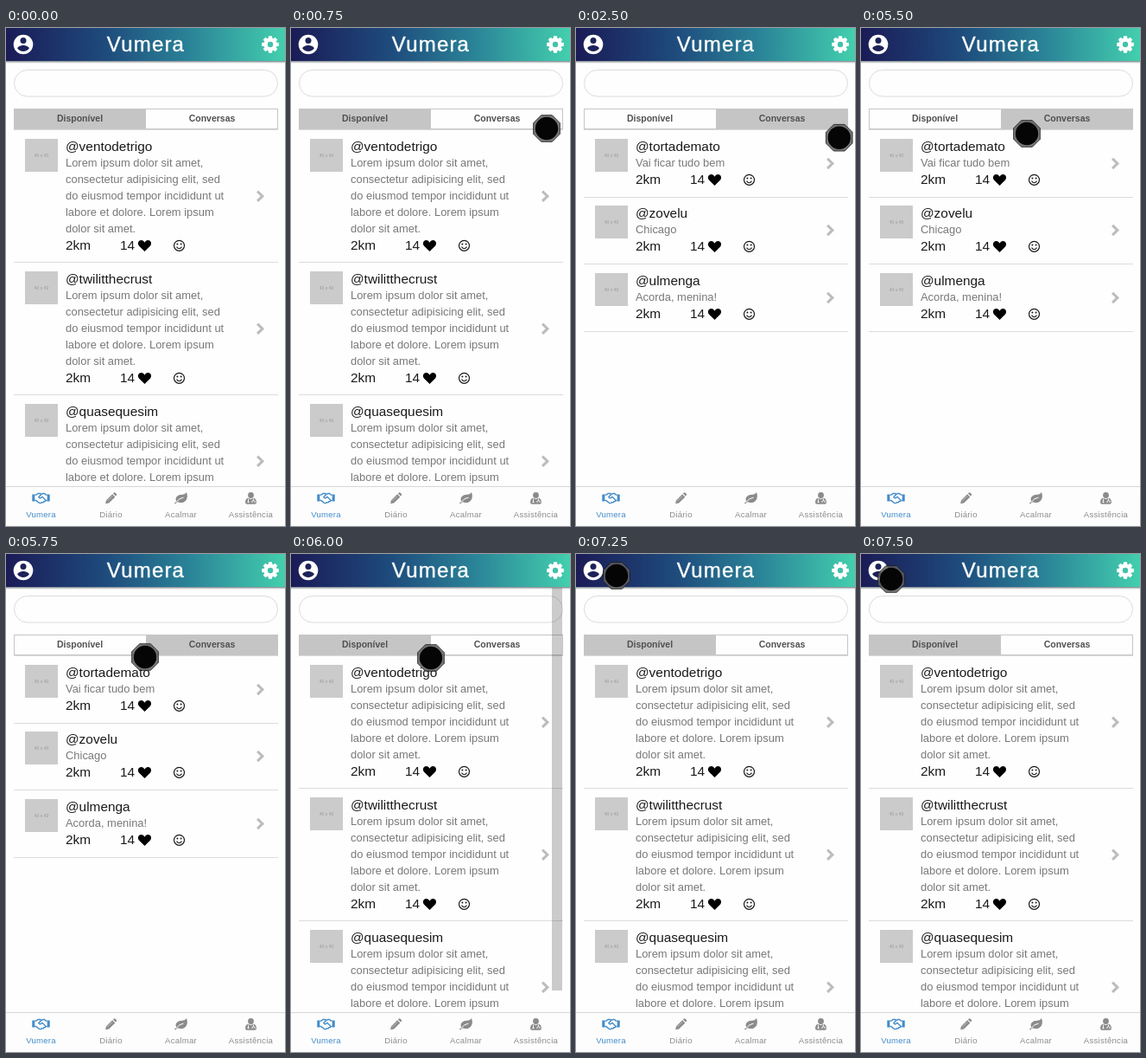
These frames come from a looping animation (323 px wide and 575 px high, 8 s). An HTML page with a canvas:

```html
<!DOCTYPE html>
<html lang="pt">
<head>
<meta charset="utf-8">
<title>Vumera</title>
<style>
html, body { margin: 0; width: 100%; height: 100%; overflow: hidden; background: #fff; }
canvas { display: block; width: 323px; height: 575px; }
</style>
</head>
<body>
<canvas id="stage"></canvas>
<script>
const W = 323, H = 575, LOOP = 8000;
const canvas = document.getElementById('stage');
const ctx = canvas.getContext('2d');
const dpr = window.devicePixelRatio || 1;
canvas.width = W * dpr;
canvas.height = H * dpr;
ctx.scale(dpr, dpr);

const FONT = '"Liberation Sans", Arial, sans-serif';
const BLUE = '#428bca', GREY = '#8b8b8b', INK = '#1a1a1a';
const LOREM = ['Lorem ipsum dolor sit amet,', 'consectetur adipisicing elit, sed',
  'do eiusmod tempor incididunt ut', 'labore et dolore. Lorem ipsum', 'dolor sit amet.'];

const available = ['@ventodetrigo', '@twilitthecrust', '@quasequesim']
  .map(name => ({ name, lines: LOREM }));
const chats = [
  { name: '@tortademato', lines: ['Vai ficar tudo bem'] },
  { name: '@zovelu', lines: ['Chicago'] },
  { name: '@ulmenga', lines: ['Acorda, menina!'] }
];

// start time, x, y of the touch dot; it jumps from one place to the next
const touches = [
  [750, 296, 116], [1000, 289.5, 117], [1250, 288, 117], [1500, 304.7, 126.7],
  [5500, 192, 122], [5750, 161, 119], [6000, 162, 120], [6500, 138, 115],
  [6750, 132, 112.7], [7000, 91, 68], [7250, 47, 25], [7500, 35, 29]
];

function text(str, x, y, size, color, { align = 'left', weight = '', spacing = 0 } = {}) {
  ctx.font = `${weight} ${size}px ${FONT}`;
  ctx.letterSpacing = `${spacing}px`;
  ctx.textAlign = align;
  ctx.fillStyle = color;
  ctx.fillText(str, x, y);
}

function rect(x, y, w, h, color) {
  ctx.fillStyle = color;
  ctx.fillRect(x, y, w, h);
}

function disc(x, y, r, color) {
  ctx.beginPath();
  ctx.arc(x, y, r, 0, Math.PI * 2);
  ctx.fillStyle = color;
  ctx.fill();
}

function fillPath(d, x, y, color) {
  ctx.save();
  ctx.translate(x, y);
  ctx.fillStyle = color;
  ctx.fill(new Path2D(d));
  ctx.restore();
}

function strokePath(d, x, y, color, width) {
  ctx.save();
  ctx.translate(x, y);
  ctx.strokeStyle = color;
  ctx.lineWidth = width;
  ctx.stroke(new Path2D(d));
  ctx.restore();
}

function userIcon(x, y) {
  const navy = '#1c2259';
  disc(x, y, 11.3, '#fff');
  disc(x, y - 4.5, 3.5, navy);
  fillPath('M-6.8 4.5C-6.7 2.3 -2.3 1 0 1S6.7 2.3 6.8 4.5C5.3 6.7 2.8 8.1 0 8.1S-5.3 6.7 -6.8 4.5Z', x, y, navy);
}

function gear(x, y) {
  disc(x, y, 7.4, '#fff');
  ctx.save();
  ctx.translate(x, y);
  for (let i = 0; i < 8; i++) {
    fillPath('M-2.6 -6L-1.9 -9.8H1.9L2.6 -6Z', 0, 0, '#fff');
    ctx.rotate(Math.PI / 4);
  }
  ctx.restore();
  disc(x, y, 3.2, '#41c2ab');
}

function header() {
  const g = ctx.createLinearGradient(0, 0, W, 0);
  g.addColorStop(0, '#1b1b56');
  g.addColorStop(0.35, '#1e4a7c');
  g.addColorStop(0.65, '#2a8297');
  g.addColorStop(1, '#43cfae');
  rect(0, 0, W, 38, g);
  rect(0, 38, W, 1, '#8f979d');
  rect(0, 39, W, 1, '#c4c8cb');
  rect(0, 40, W, 1, '#eeeeee');
  text('Vumera', 162, 27, 24, '#fff', { align: 'center', spacing: 1.2 });
  ctx.strokeStyle = '#fff';
  ctx.lineWidth = 0.4;
  ctx.strokeText('Vumera', 162, 27);
  userIcon(20, 19);
  gear(306, 19);
}

function searchBox() {
  ctx.beginPath();
  ctx.roundRect(9.5, 48.5, 305, 30.5, 15.2);
  ctx.strokeStyle = '#dcdcdc';
  ctx.lineWidth = 1;
  ctx.stroke();
}

function segments(chatOpen) {
  rect(chatOpen ? 162 : 9, 93, 153, 24, '#c5c5c5');
  ctx.lineWidth = 1;
  ctx.strokeStyle = '#c6c6c6';
  ctx.strokeRect(9.5, 93.5, 305, 23);
  rect(9, 117, 306, 1, '#dadada');
  const style = { align: 'center', weight: 'bold' };
  text('Disponível', 85.5, 108, 10.5, '#505050', style);
  text('Conversas', 238.5, 108, 10.5, '#505050', style);
}

function heart(x, y) {
  fillPath('M0 6.8L-6.6 .2C-9 -3 -6.6 -6.4 -3.8 -6.2C-1.8 -6 -.6 -4.6 0 -3.6' +
    'C.6 -4.6 1.8 -6 3.8 -6.2C6.6 -6.4 9 -3 6.6 .2Z', x, y, '#000');
}

function smile(x, y) {
  strokePath('M6 0A6 6 0 1 1 -6 0A6 6 0 1 1 6 0M-3 1.3Q0 5.6 3 1.3', x, y, INK, 1.2);
  disc(x - 2.1, y - 1.9, 1, INK);
  disc(x + 2.1, y - 1.9, 1, INK);
}

function row(item, top) {
  const n = item.lines.length, last = top + 33 + n * 19;
  const height = n > 1 ? 153 : 77.5;
  rect(22, top + 10, 38, 38, '#cbcbcb');
  text('40 x 40', 41, top + 31, 5, '#999', { align: 'center' });
  text(item.name, 69, top + 23.5, 15.4, INK);
  item.lines.forEach((line, i) => text(line, 69, top + 42 + i * 19, 12.93, '#787878'));
  text('2km', 69, last + 10, 15.4, INK);
  text('14', 132, last + 10, 15.4, INK);
  heart(160.5, last + 5.3);
  smile(200.5, last + 5.3);
  strokePath('M-3.4 -5.6L2.4 0L-3.4 5.6', 294.5, top + height / 2 - 0.3, '#bcbcbc', 3);
  rect(9, Math.round(top + height - 1), 306, 1, '#dcdcdc');
}

function list(items, step) {
  ctx.save();
  ctx.beginPath();
  ctx.rect(0, 117, W, 412);
  ctx.clip();
  items.forEach((item, i) => row(item, Math.round(118 + i * step)));
  ctx.restore();
}

function handshake(x, y) {
  fillPath('M-10.2 -4H-7.2V4H-10.2ZM10.2 -4H7.2V4H10.2Z', x, y, BLUE);
  strokePath('M-7.2 -3.4H-5.6L-3.4 -5H-1L.6 -4.2L2.4 -5H4L5.8 -3.4H7.2' +
    'M.6 -4.2L-2.6 -1Q-1.6 1.4 .6 -.6L1.6 -1.2L5.2 2.4' +
    'M-7.2 3H-5.8L-2 5.8Q0 6.6 1 5.2Q3 5.8 3.4 4.2Q5.4 4.4 5.4 3H7.2', x, y, BLUE, 1.4);
}

function pencil(x, y) {
  fillPath('M-6.3 6.3L-5.6 2.4L1.6 -4.8L4.8 -1.6L-2.4 5.6Z' +
    'M2.4 -5.6L3.6 -6.6Q4.4 -7 5.2 -6.2L6.4 -5Q7 -4.2 6.4 -3.4L5.5 -2.5Z', x, y, GREY);
  strokePath('M-4.2 3.2L1.6 -2.6', x, y, '#d5d5d5', 0.7);
}

function leaf(x, y) {
  fillPath('M-5 4.6C-8 -1 -3 -3.6 1 -3.8C4 -4 5.5 -5 6.4 -6.6C9 -1 6.4 5.6 0 5.6' +
    'C-2.4 5.6 -3.4 4.6 -4.6 5.2L-6.6 7L-7.6 5.8Z', x, y, GREY);
  strokePath('M-5.2 4.8Q-2 .2 3 -.4', x, y, '#fff', 1);
}

function doctor(x, y) {
  disc(x, y - 3.5, 3.4, GREY);
  fillPath('M-6.4 5C-6.4 1.2 -4.8 -.2 -3 -.2Q0 2 3 -.2C4.8 -.2 6.4 1.2 6.4 5Q6.4 6.8 4.6 6.8H-4.6Q-6.4 6.8 -6.4 5Z', x, y, GREY);
  strokePath('M-3 .6V3.6M3 .4V2.6M1.4 5V4Q1.4 2.6 3 2.6Q4.6 2.6 4.6 4V5', x, y, '#fff', 0.9);
  disc(x - 3, y + 4.2, 1, '#fff');
}

function tabBar() {
  rect(0, 529, W, 46, '#fdfdfd');
  rect(0, 529, W, 1, '#d6d6d6');
  handshake(40.5, 542.5);
  pencil(121.5, 543);
  leaf(202.5, 542.5);
  doctor(283.5, 543);
  ['Vumera', 'Diário', 'Acalmar', 'Assistência'].forEach((label, i) =>
    text(label, 40.5 + i * 81, 565, 9.6, i ? GREY : BLUE, { align: 'center', spacing: 0.25 }));
}

function touchDot(t) {
  const spot = touches.filter(p => p[0] <= t).pop();
  if (!spot) return;
  const [, x, y] = spot;
  ctx.beginPath();
  for (let i = 0; i < 8; i++) {
    const a = (i + 0.5) * Math.PI / 4;
    ctx.lineTo(x + 16.6 * Math.cos(a), y + 16.6 * Math.sin(a));
  }
  ctx.closePath();
  ctx.fillStyle = 'rgba(95,95,95,.85)';
  ctx.fill();
  ctx.strokeStyle = 'rgba(25,25,25,.8)';
  ctx.lineWidth = 1;
  ctx.stroke();
  disc(x, y, 13.2, '#050505');
}

function scrollBar(t) {
  if (t < 6000 || t >= 6750) return;
  rect(302, 39, 12, 465, `rgba(0,0,0,${t < 6500 ? 0.2 : 0.09})`);
}

function draw(t) {
  const chatOpen = t >= 2500 && t < 6000;
  rect(0, 0, W, H, '#fefefe');
  header();
  searchBox();
  segments(chatOpen);
  list(chatOpen ? chats : available, chatOpen ? 77.4 : 153);
  tabBar();
  scrollBar(t);
  touchDot(t);
}

const start = performance.now();
function tick() {
  draw((performance.now() - start) % LOOP);
  requestAnimationFrame(tick);
}
tick();
</script>
</body>
</html>
```
